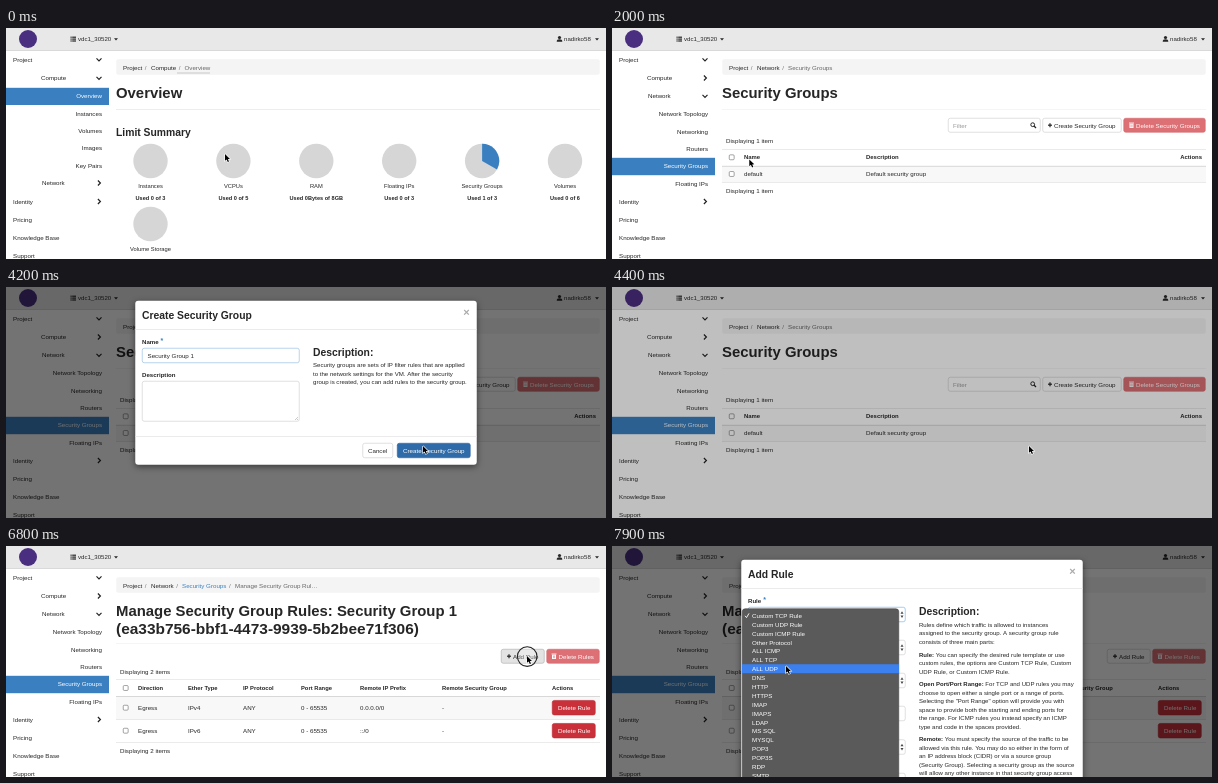
Recreate the animation shown at these times as an HTML page with a canvas. Size 600x231 px, loop 8 s.

```html
<!DOCTYPE html>
<html lang="en">
<head>
<meta charset="utf-8">
<title>Security group walkthrough</title>
<style>
html, body { margin: 0; width: 100%; height: 100%; overflow: hidden; background: #fff; }
canvas { display: block; width: 600px; height: 231px; }
</style>
</head>
<body>
<canvas id="stage"></canvas>
<script>
const W = 600, H = 231, LOOP = 8000, STEP = 100;
const canvas = document.getElementById('stage');
const c = canvas.getContext('2d');
const dpr = window.devicePixelRatio || 1;
canvas.width = W * dpr;
canvas.height = H * dpr;

const BLUE = '#3a80c1', INK = '#262626', RED = '#c9303a', PALE_RED = '#dc7075';
const BODY = 6.2, BOLD = 5.95, TITLE = 14.9, SUB = 10.35;

// Pointer stops: time, x, y
const path = [
  [0, 219, 126], [400, 50, 153], [700, 50, 153], [800, 79, 137], [1800, 79, 137],
  [2600, 452, 101], [3000, 452, 101], [3500, 200, 66], [3800, 200, 66],
  [4100, 417, 159], [4500, 417, 159], [5400, 559, 151], [6100, 559, 151],
  [6700, 521, 110], [7100, 521, 110], [7500, 190, 67], [7600, 190, 67],
  [7900, 174, 120]
];
const clicks = [500, 1000, 2700, 3500, 4300, 6000, 6800, 7500];
const pointer = { x: 0, y: 0 };
let shade = 0;

const clamp = v => Math.max(0, Math.min(1, v));
const ramp = (t, a, b) => { const p = clamp((t - a) / (b - a)); return p * p * (3 - 2 * p); };

function movePointer(t) {
  let i = 0;
  while (i < path.length - 2 && t >= path[i + 1][0]) i++;
  const [t0, x0, y0] = path[i], [t1, x1, y1] = path[i + 1];
  const p = ramp(t, t0, t1);
  pointer.x = x0 + (x1 - x0) * p;
  pointer.y = y0 + (y1 - y0) * p;
}

const over = (x, y, w, h) =>
  pointer.x >= x && pointer.x < x + w && pointer.y >= y && pointer.y < y + h;

function text(str, x, y, o = {}) {
  const size = o.size || (o.bold ? BOLD : BODY);
  c.font = `${o.bold ? 'bold ' : ''}${size}px "Liberation Sans", Arial, sans-serif`;
  c.textAlign = o.align || 'left';
  c.fillStyle = o.color || INK;
  c.fillText(str, x, y + size * 0.35);
  return c.measureText(str).width;
}

function rect(x, y, w, h, fill) {
  c.fillStyle = fill;
  c.fillRect(x, y, w, h);
}

function box(x, y, w, h, fill, stroke, r = 2) {
  c.beginPath();
  c.roundRect(x + 0.25, y + 0.25, w - 0.5, h - 0.5, r);
  c.fillStyle = fill;
  c.fill();
  if (stroke) {
    c.strokeStyle = stroke;
    c.lineWidth = 0.6;
    c.stroke();
  }
}

function line(pts, color = INK, width = 1) {
  c.beginPath();
  pts.forEach(([x, y]) => c.lineTo(x, y));
  c.strokeStyle = color;
  c.lineWidth = width;
  c.stroke();
}

function disc(x, y, r, fill) {
  c.beginPath();
  c.arc(x, y, r, 0, 7);
  c.fillStyle = fill;
  c.fill();
}

function shape(pts, fill) {
  c.beginPath();
  pts.forEach(([x, y]) => c.lineTo(x, y));
  c.closePath();
  c.fillStyle = fill;
  c.fill();
}

const caret = (x, y) => shape([[x - 2, y - 1], [x + 2, y - 1], [x, y + 1.2]], INK);

// turn: 0 points right, 1 points down
function chevron(y, turn) {
  c.save();
  c.translate(93, y);
  c.rotate(turn * Math.PI / 2);
  line([[-1.1, -2.5], [1.4, 0], [-1.1, 2.5]], '#222', 1.2);
  c.restore();
}

function trash(x, y) {
  rect(x, y - 1.5, 4, 4.3, '#fff');
  rect(x - 0.5, y - 2.6, 5, 0.8, '#fff');
  rect(x + 1.2, y - 0.8, 0.5, 2.8, PALE_RED);
  rect(x + 2.3, y - 0.8, 0.5, 2.8, PALE_RED);
}

function checkbox(y) {
  box(117, y - 2.7, 5.4, 5.4, '#fff', '#666', 1);
}

function topBar() {
  rect(0, 0, W, 22.5, '#e8e8e8');
  rect(0, 22.3, W, 0.7, '#cfcfcf');
  disc(22, 11, 9, '#4a2f80');
  for (let i = 0; i < 3; i++) {
    rect(64.5, 8.6 + i * 1.9, 1.2, 1.2, INK);
    rect(66.2, 8.6 + i * 1.9, 3.8, 1.2, INK);
  }
  text('vdc1_30520', 72, 11, { size: 6.1 });
  caret(110, 11.2);
  disc(553.5, 9.5, 1.6, INK);
  c.beginPath();
  c.ellipse(553.5, 13.7, 2.8, 2.4, 0, Math.PI, 0);
  c.fill();
  text('nadirko58', 558, 11, { size: 6.1 });
  caret(591, 11.2);
}

function submenu(items, y, height, active) {
  if (height <= 0) return;
  c.save();
  c.beginPath();
  c.rect(0, y, 103, height);
  c.clip();
  items.forEach((name, i) => {
    const top = y + i * 17.4, on = name === active;
    if (on) rect(0, top, 103, 17.4, BLUE);
    else if (over(0, top, 103, 17.4)) rect(0, top, 103, 17.4, '#e4e4e4');
    text(name, 96, top + 8.4, { align: 'right', color: on ? '#fff' : INK });
  });
  c.restore();
}

function sideBar(t) {
  const p = ramp(t, 500, 800), full = 87;
  const active = t < 1700 ? 'Overview' : 'Security Groups';
  text('Project', 7, 31.5);
  chevron(31.5, 1);
  text('Compute', 35, 50);
  chevron(50, 1 - p);
  submenu(['Overview', 'Instances', 'Volumes', 'Images', 'Key Pairs'], 59.6, full * (1 - p), active);
  const ny = 155 - full * p;
  text('Network', 36, ny);
  chevron(ny, p);
  submenu(['Network Topology', 'Networking', 'Routers', 'Security Groups', 'Floating IPs'],
    ny + 9.6, full * p, active);
  text('Identity', 7, 173.5);
  chevron(173.5, 0);
  text('Pricing', 7, 191.5);
  text('Knowledge Base', 7, 210);
  text('Support', 7, 228);
}

function crumbs(parts) {
  box(110, 31, 484, 16, '#f4f4f4', null);
  parts.forEach(([name, x, color], i) => {
    const w = text(name, x, 39.8, { color: color || (i < 2 ? INK : '#666') });
    if (i < parts.length - 1) text('/', x + w + 2.6, 39.8, { color: '#777' });
  });
}

function pie(x, y, name, used, share = 0) {
  disc(x, y, 17.2, '#d6d6d6');
  if (share) {
    c.beginPath();
    c.moveTo(x, y);
    c.arc(x, y, 17.2, -Math.PI / 2, -Math.PI / 2 + share * Math.PI * 2);
    c.fillStyle = BLUE;
    c.fill();
  }
  text(name, x, y + 25.2, { size: 5.75, align: 'center' });
  text('Used ' + used, x, y + 36.8, { size: 5.6, bold: true, align: 'center' });
}

function overview(t) {
  crumbs([['Project', 117], ['Compute', 145], ['Overview', 178.5]]);
  if (t < 100) line([[171, 45], [204, 45]], '#999', 0.5);
  text('Overview', 110, 65, { size: TITLE, bold: true });
  rect(110, 81, 484, 0.7, '#e6e6e6');
  text('Limit Summary', 110, 104.5, { size: SUB, bold: true });
  [['Instances', '0 of 3'], ['VCPUs', '0 of 5'], ['RAM', '0Bytes of 8GB'],
   ['Floating IPs', '0 of 3'], ['Security Groups', '1 of 3', 1 / 3], ['Volumes', '0 of 6']]
    .forEach((d, i) => pie(144.5 + i * 82.9, 133, ...d));
  pie(144.5, 196, 'Volume Storage', '0Bytes of 300GB');
}

function button(x, y, w, h, label, tx, fill = '#fff', color = INK, edge = '#ccc') {
  const hot = fill === '#fff' && !shade && over(x, y, w, h);
  box(x, y, w, h, hot ? '#e3e3e3' : fill, hot ? '#aaa' : edge);
  text(label, tx, y + h / 2 + 0.1, { color });
}

function plusIcon(x, y) {
  line([[x - 2, y], [x + 2, y]], INK, 1.2);
  line([[x, y - 2], [x, y + 2]], INK, 1.2);
}

function groups(t) {
  const made = t >= 4500, word = made ? '2 items' : '1 item';
  crumbs([['Project', 117], ['Network', 145], ['Security Groups', 176]]);
  text('Security Groups', 110, 65, { size: TITLE, bold: true });
  rect(110, 81, 484, 0.6, '#eee');
  box(336, 90, 92.5, 14.5, '#fff', '#ccc');
  text('Filter', 341, 97.5, { color: '#999' });
  c.beginPath();
  c.arc(420.7, 96.7, 1.9, 0, 7);
  c.strokeStyle = INK;
  c.lineWidth = 1;
  c.stroke();
  line([[422, 98], [424, 100]], INK, 1.2);
  button(430.5, 90, 79, 14.5, 'Create Security Group', 442);
  plusIcon(438, 97.2);
  button(511.5, 90, 82, 14.5, 'Delete Security Groups', 524, PALE_RED, '#fff', '#d2686c');
  trash(517.5, 97.2);
  text('Displaying ' + word, 114, 113);
  rect(110, 121, 484, 0.6, '#ddd');
  checkbox(129.3);
  const dx = made ? 309 : 254;
  text('Name', 132, 129.3, { bold: true });
  text('Description', dx, 129.3, { bold: true });
  if (made) text('Actions', 532, 129.3, { bold: true });
  else text('Actions', 590, 129.3, { bold: true, align: 'right' });
  if (made) {
    rect(110, 138.5, 484, 19.5, over(110, 138.5, 484, 19.5) ? '#eee' : '#f8f8f8');
    checkbox(148.5);
    text('Security Group 1', 132, 148.5);
    button(532, 142, 46.5, 13.5, 'Manage Rules', 537);
    box(578, 142, 12, 13.5, '#fff', '#ccc');
    caret(584, 148.8);
    rect(110, 158, 484, 0.6, '#ddd');
    checkbox(168);
    text('default', 132, 168);
    text('Default security group', dx, 168);
  } else {
    rect(110, 138.5, 484, 15.5, '#f8f8f8');
    checkbox(146);
    text('default', 132, 146);
    text('Default security group', dx, 146);
  }
  rect(110, 137.8, 484, 1, '#d8d8d8');
  rect(110, made ? 177 : 154, 484, 0.6, '#ddd');
  text('Displaying ' + word, 114, made ? 184.8 : 162.8);
  if (t >= 4700) toast();
}

function toast() {
  const color = '#3c763d';
  box(452, 26, 141, 31.5, '#d0ebc8', '#c2e0b5');
  const w = text('Success:', 460, 37, { bold: true, color });
  text('Successfully created security', 460 + w + 1.7, 37, { color, size: 6.1 });
  text('group: Security Group 1', 460, 45.7, { color, size: 6.1 });
  text('×', 582, 37, { size: 10, bold: true, align: 'center', color: '#a3bf9d' });
}

function rules() {
  crumbs([['Project', 117], ['Network', 145], ['Security Groups', 176, BLUE],
    ['Manage Security Group Rul…', 229]]);
  text('Manage Security Group Rules: Security Group 1', 110, 65, { size: TITLE, bold: true });
  text('(ea33b756-bbf1-4473-9939-5b2bee71f306)', 110, 82.3, { size: 15.45, bold: true });
  rect(110, 97, 484, 0.6, '#eee');
  button(495, 103, 43.5, 14.5, 'Add Rule', 507);
  plusIcon(503, 110.2);
  button(540.5, 103, 53, 14.5, 'Delete Rules', 552.5, PALE_RED, '#fff', '#d2686c');
  trash(546, 110.2);
  text('Displaying 2 items', 114, 125.5);
  rect(110, 133.3, 484, 0.6, '#ddd');
  const cols = [132, 182, 237, 295, 354, 436, 546];
  checkbox(142);
  ['Direction', 'Ether Type', 'IP Protocol', 'Port Range', 'Remote IP Prefix',
   'Remote Security Group', 'Actions'].forEach((s, i) => text(s, cols[i], 142, { bold: true, size: 5.8 }));
  [['IPv4', '0.0.0.0/0'], ['IPv6', '::/0']].forEach(([type, prefix], r) => {
    const y = 161.7 + r * 23;
    if (!r) rect(110, 150.5, 484, 23, '#f8f8f8');
    checkbox(y);
    ['Egress', type, 'ANY', '0 - 65535', prefix, '-'].forEach((s, i) => text(s, cols[i], y));
    button(546, y - 7.5, 43.5, 15, 'Delete Rule', 552, RED, '#fff', '#b52b34');
    rect(110, y + 11.6, 484, 0.6, '#ddd');
  });
  rect(110, 150, 484, 1, '#d8d8d8');
  text('Displaying 2 items', 114, 204.5);
}

function panel(x, y, w, h) {
  c.save();
  c.shadowColor = 'rgba(0,0,0,.5)';
  c.shadowBlur = 6 * dpr;
  c.shadowOffsetY = 2 * dpr;
  box(x, y, w, h, '#fff', null, 3);
  c.restore();
}

// head: clock position of the darkest spoke
function loader(head) {
  panel(265, 13.5, 70, 70.5);
  for (let i = 0; i < 12; i++) {
    const a = i * Math.PI / 6, age = (((head - i) % 12) + 12) % 12;
    const s = Math.sin(a), k = -Math.cos(a);
    c.lineCap = 'round';
    line([[300 + s * 6.5, 48.5 + k * 6.5], [300 + s * 13, 48.5 + k * 13]],
      `rgba(0,0,0,${Math.max(0.25, 1 - age * 0.13)})`, 2);
    c.lineCap = 'butt';
  }
  text('Loading...', 300, 75, { size: 6.4, align: 'center' });
}

function dialog(title, h) {
  panel(129, 13.5, 342, h);
  text(title, 136, 28, { size: SUB, bold: true });
  text('×', 460.5, 25, { size: 11, bold: true, align: 'center', color: '#aaa' });
  rect(129, 42, 342, 0.7, '#e2e2e2');
  text('Description:', 307, 65, { size: SUB, bold: true });
}

function label(str, y, needed) {
  const w = text(str, 136, y, { bold: true, size: 6.1 });
  if (needed) text('*', 136 + w + 2, y - 1.5, { bold: true, size: 7, color: BLUE });
}

function createDialog(t) {
  dialog('Create Security Group', 164.5);
  label('Name', 55, true);
  const typing = t >= 3500 && t < 4300;
  box(136, 61, 157.5, 15, '#fff', typing ? '#88b8e0' : '#ccc');
  const name = 'Security Group 1';
  text(name.slice(0, Math.round(name.length * clamp((t - 3600) / 300))), 141.5, 68.8);
  label('Description', 87.5);
  box(136, 94, 157.5, 40.5, '#fff', '#ccc');
  line([[289, 133], [292, 130]], '#999', 0.5);
  line([[291, 133], [292, 132]], '#999', 0.5);
  ['Security groups are sets of IP filter rules that are applied',
   'to the network settings for the VM. After the security',
   'group is created, you can add rules to the security group.']
    .forEach((s, i) => text(s, 307, 78.3 + i * 8.5, { size: 6.1 }));
  rect(129, 149, 342, 0.7, '#e2e2e2');
  button(356.5, 156, 30.5, 15, 'Cancel', 362);
  const hot = over(391, 156, 73, 15);
  button(391, 156, 73.5, 15, 'Create Security Group', 397, hot ? '#2f6ba8' : BLUE, '#fff', '#2e69a3');
}

function select(y, value, edge = '#ccc') {
  box(136, y, 157.5, 15, '#fff', edge);
  text(value, 141.5, y + 7.7);
  shape([[288.5, y + 6.7], [291.5, y + 6.7], [290, y + 4.2]], '#444');
  shape([[288.5, y + 8.5], [291.5, y + 8.5], [290, y + 11]], '#444');
}

function ruleDialog(t) {
  dialog('Add Rule', 240);
  label('Rule', 55, true);
  select(61, 'Custom TCP Rule', t >= 7500 ? '#66afe9' : '#ccc');
  label('Direction', 88);
  select(94, 'Ingress');
  label('Open Port', 121, true);
  select(127, 'Port');
  label('Port', 154);
  box(136, 160, 157.5, 15, '#fff', '#ccc');
  label('Remote', 187.5, true);
  select(193.5, 'CIDR');
  label('CIDR', 221);
  box(136, 227, 157.5, 15, '#fff', '#ccc');
  const notes = [
    [78.5, '', ['Rules define which traffic is allowed to instances', 'assigned to the security group. A security group rule',
      'consists of three main parts:']],
    [108.5, 'Rule:', ['You can specify the desired rule template or use', 'custom rules, the options are Custom TCP Rule, Custom',
      'UDP Rule, or Custom ICMP Rule.']],
    [138, 'Open Port/Port Range:', ['For TCP and UDP rules you may', 'choose to open either a single port or a range of ports.',
      'Selecting the "Port Range" option will provide you with', 'space to provide both the starting and ending ports for',
      'the range. For ICMP rules you instead specify an ICMP', 'type and code in the spaces provided.']],
    [193, 'Remote:', ['You must specify the source of the traffic to be', 'allowed via this rule. You may do so either in the form of',
      'an IP address block (CIDR) or via a source group', '(Security Group). Selecting a security group as the source',
      'will allow any other instance in that security group access']]
  ];
  for (const [y, lead, lines] of notes) {
    const w = lead ? text(lead, 307, y, { bold: true, size: 6 }) + 1.7 : 0;
    lines.forEach((s, i) => text(s, 307 + (i ? 0 : w), y + i * 8.5, { size: 6.05 }));
  }
  if (t >= 7600) dropdown();
}

function dropdown() {
  const pitch = 8.89, top = 64.9;
  box(130, 62.5, 157, 180, '#5a5a5a', '#444', 3);
  const picked = Math.max(0, Math.floor((pointer.y + 1 - top) / pitch));
  rect(130, top + picked * pitch, 157, pitch, '#3b80ee');
  ['Custom TCP Rule', 'Custom UDP Rule', 'Custom ICMP Rule', 'Other Protocol', 'ALL ICMP',
   'ALL TCP', 'ALL UDP', 'DNS', 'HTTP', 'HTTPS', 'IMAP', 'IMAPS', 'LDAP', 'MS SQL', 'MYSQL',
   'POP3', 'POP3S', 'RDP', 'SMTP']
    .forEach((s, i) => text(s, 140, top + (i + 0.54) * pitch, { color: '#fff' }));
  line([[133, 69.8], [134.5, 71.6], [137, 67.4]], '#fff', 0.9);
}

function drawPointer(t) {
  const { x, y } = pointer;
  if (clicks.includes(t)) {
    c.beginPath();
    c.arc(x + 0.2, y + 0.6, 9.8, 0, 7);
    c.fillStyle = 'rgba(255,255,255,.25)';
    c.fill();
    c.strokeStyle = '#222';
    c.lineWidth = 1.1;
    c.stroke();
  }
  const arrow = [[0, 0], [0, 6.8], [1.6, 5.4], [2.8, 8], [4, 7.4], [2.9, 5], [5, 4.9]]
    .map(([dx, dy]) => [x + dx, y + dy]);
  line([...arrow, arrow[0]], '#fff', 1.2);
  shape(arrow, '#000');
}

function draw(t) {
  const between = (a, b) => t >= a && t < b;
  const masked = between(1100, 1700) || between(2800, 4400) || t >= 6900;
  shade = masked ? 0.55 : between(4400, 4500) ? 0.25 : 0;

  movePointer(t);
  c.setTransform(dpr, 0, 0, dpr, 0, 0);
  rect(0, 0, W, H, '#fff');
  topBar();
  sideBar(t);
  if (t < 1700) overview(t);
  else if (t < 6100) groups(t);
  else rules();
  if (shade) rect(0, 0, W, H, `rgba(0,0,0,${shade})`);

  if (between(1100, 1700)) loader(5 + (t - 1200) * 0.012);
  if (between(2800, 3100)) loader(3 + (t - 2800) * 0.012);
  if (between(6900, 7100)) loader(3 + (t - 6900) * 0.012);

  const enter = (start, paint) => {
    const p = clamp((t - start) / 200 + 0.5);
    c.save();
    c.globalAlpha = p;
    c.translate(0, (p - 1) * 20);
    paint(t);
    c.restore();
  };
  if (between(3100, 4400)) enter(3100, createDialog);
  if (t >= 7100) enter(7100, ruleDialog);
  drawPointer(t);
}

function tick() {
  const t = performance.now() % LOOP;
  draw(Math.floor(t / STEP) * STEP);
  requestAnimationFrame(tick);
}
tick();
</script>
</body>
</html>
```
